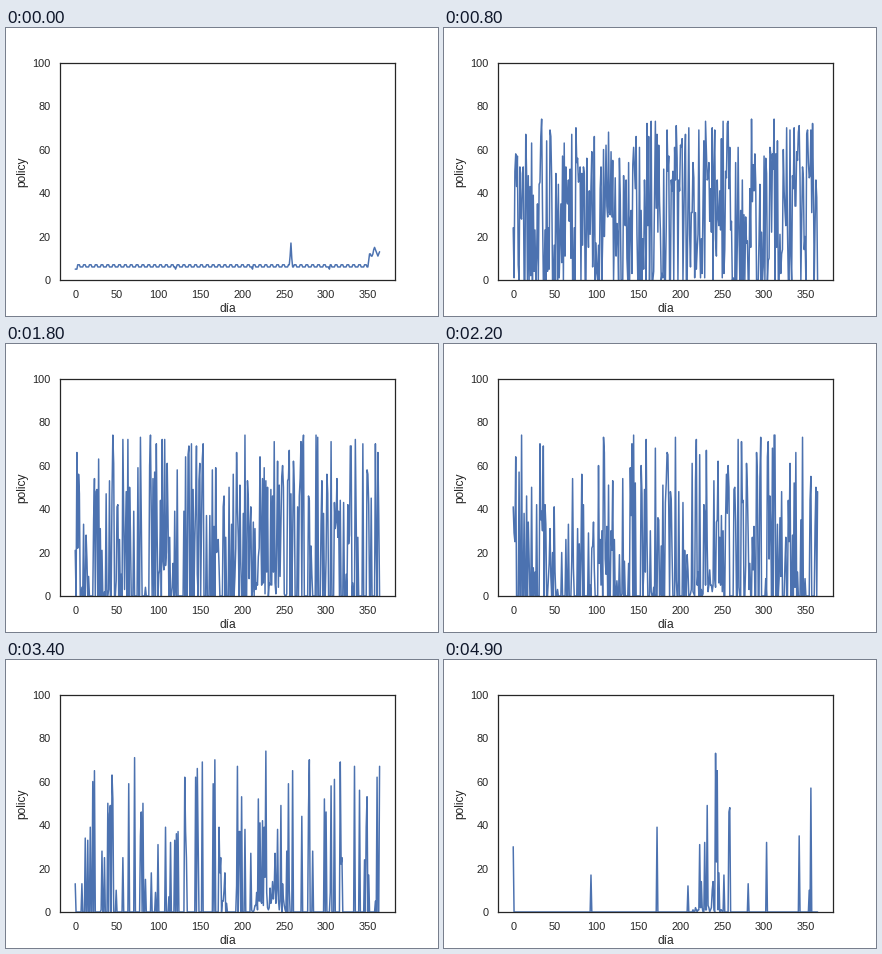
Write a matplotlib script that moves like this. It is 432 by 288 pixels and loops after 7.5 s.

```python
import numpy as np
import matplotlib.pyplot as plt
from matplotlib.animation import FuncAnimation

FRAMES, STEP = 75, 100
LAST = 49            # the policy has settled from here on
DAYS = np.arange(365)
TOP = 74             # largest action
INK = ".15"

# Main peaks left once exploring has ended, as day: value
PEAKS = {0: 30, 93: 17, 172: 39, 209: 12, 223: 31, 229: 32, 232: 49, 239: 14,
         242: 73, 243: 23, 244: 65, 246: 18, 252: 17, 258: 46, 259: 48,
         281: 13, 303: 32, 342: 35, 354: 10, 356: 57}


def first_policy():
    """Weekly rhythm with short dips and a rise at the end of the year."""
    p = np.where((DAYS - 3) % 7 < 3, 7., 6.)
    p[:3] = 5
    p[[120, 212, 304]] = 5
    p[257:260] = 11, 17, 10
    rise = np.interp(DAYS, [350, 352, 355, 358, 362, 364],
                     [6, 12, 11, 15, 11, 13])
    p[350:] = rise[350:].round()
    return p


def season(rng, scale):
    """Small actions around the busy weeks, fading to both sides."""
    fade = np.exp(-((DAYS - 232) / 16.) ** 4)
    return np.floor(rng.exponential(scale, DAYS.size) * fade)


def explore(rng, share):
    """Random actions on a share of the days, none on the others."""
    active = rng.random(DAYS.size) < share
    return np.where(active, rng.integers(0, TOP + 1, DAYS.size), 0)


def policy(k):
    if k == 0:
        return first_policy()
    rng = np.random.default_rng(100 + k)
    if k == LAST:
        p = season(rng, 4)
        p[list(PEAKS)] = list(PEAKS.values())
        return p
    tries = explore(rng, (1 - k / 50) ** 1.3)
    tries[0] = rng.integers(10, 61)
    return np.where(tries > 0, tries, season(rng, 9).clip(0, TOP))


plt.rcParams.update({
    "font.family": "Liberation Sans", "text.color": INK,
    "axes.edgecolor": INK, "axes.labelcolor": INK, "axes.linewidth": 1.25,
    "axes.labelsize": 12, "xtick.color": INK, "ytick.color": INK,
    "xtick.labelsize": 11, "ytick.labelsize": 11,
    "lines.solid_capstyle": "round"})

fig, ax = plt.subplots(figsize=(6, 4), dpi=72)
fig.subplots_adjust(left=.125, right=.9, bottom=.125, top=.88)
ax.tick_params(length=6, bottom=False, left=False)
ax.set(xlim=(-18.2, 382.2), ylim=(0, 100), xlabel="día", ylabel="policy",
       xticks=range(0, 351, 50), yticks=range(0, 101, 20))
line, = ax.plot(DAYS, first_policy(), color="#4C72B0", lw=1.5)


def draw(i):
    line.set_ydata(policy(min(i, LAST)))
    return line,


anim = FuncAnimation(fig, draw, frames=FRAMES, interval=STEP, repeat=True)
plt.show()
```
